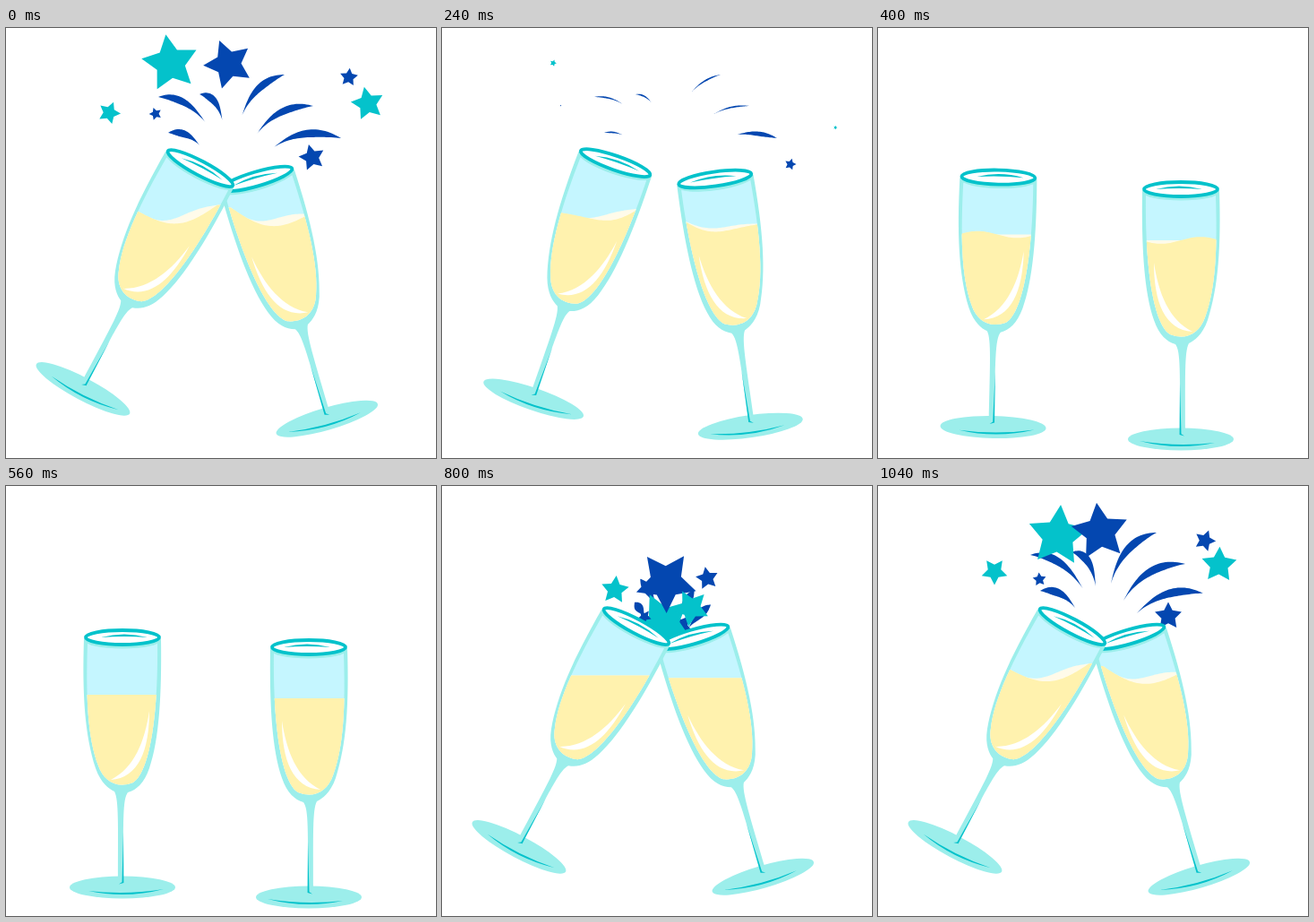
Animation of 480x480 px, one loop 1120 ms. Source, as an HTML page with a canvas:

```html
<!DOCTYPE html>
<html lang="en">
<head>
<meta charset="utf-8">
<title>Champagne toast</title>
<style>
html, body { margin: 0; height: 100%; overflow: hidden; background: #fff; }
canvas { display: block; }
</style>
</head>
<body>
<canvas id="stage" width="480" height="480"></canvas>
<script>
const ctx = document.getElementById('stage').getContext('2d');
const STEP = 80, STEPS = 14, CLINK = 10;
const TEAL = '#04c2cb', BLUE = '#0447b0', GLASS = '#9ceeeb', CLEAR = '#c5f6ff',
      WINE = '#fff2ae', FOAM = '#fffbea';
const { sin, cos, PI, min, max } = Math;

// Glass outlines; the origin is the centre of the foot.
const outer = new Path2D('M-43-278C-45-215-42-170-30-133C-24-116-15-110-9-107C-4-98-5-70-5-5L1-4C1-75 0-98 6-106C16-109 24-116 30-133C41-165 44-215 43-278Z');
const inner = new Path2D('M-39-272C-41-215-39-167-27-136C-21-118-6-110 12-117C32-130 40-200 39-272Z');
const shine = new Path2D('M30-197C25-163 13-133-13-120C18-122 30-153 30-197Z');
const rimArc = new Path2D('M-24-279Q2-286 28-279Q2-281-24-279Z');
const footArc = new Path2D('M-38 4Q4 13 46 2Q4 9-38 4Z');
const stemLine = new Path2D('M1-62L1.4-5L-4-3.5L-.5-6Z');

// Feet shift and lift as the glasses tilt by a degrees.
const left = {
  lean: 28, release: 1.5, mirror: 1,
  foot: a => [130 - 1.2 * a - .0133 * a * a, 448 - 2.1 * a + .0175 * a * a],
  level: a => -215 + .03 * a * a
};
const right = {
  lean: 16.3, release: 1, mirror: -1,
  foot: a => [338 + .3 * a + .058 * a * a, 459 - 2.1 * a + .043 * a * a],
  level: () => -222
};

// colour, angle, radius, life in steps, then start, control and end of the path
const stars = [
  [BLUE, 42, 16, 8, 266, 157, 328, 138, 374, 148],
  [TEAL, 47, 36, 7.2, 247, 154, 206, 19, 145, 31],
  [BLUE, 35, 35, 6, 250, 107, 246, 34, 250, 30],
  [TEAL, 78, 16, 6, 193, 116, 116, 82, 95, 102],
  [BLUE, 37, 8, 7.2, 226, 146, 176, 92, 143, 87],
  [BLUE, 62, 13, 6, 296, 103, 377, 43, 410, 55],
  [TEAL, 44, 21, 7.2, 278, 136, 406, 60, 433, 96]
];

// life in steps, then start, control and tip
const streaks = [
  [7.5, 229, 115, 204, 74, 170, 77],
  [7.5, 243, 112, 238, 74, 216, 74],
  [7.5, 260, 109, 272, 62, 311, 52],
  [7.5, 274, 128, 298, 85, 343, 87],
  [9, 289, 142, 325, 106, 374, 123],
  [7.5, 220, 136, 204, 113, 181, 117]
];

const clamp = t => min(1, max(0, t));
const smooth = t => t * t * (3 - 2 * t);

function curve([x0, y0, x1, y1, x2, y2], t) {
  const mix = (a, b, c) => (1 - t) ** 2 * a + 2 * t * (1 - t) * b + t * t * c;
  return [mix(x0, x1, x2), mix(y0, y1, y2)];
}

function fill(color, path) {
  ctx.fillStyle = color;
  path ? ctx.fill(path) : ctx.fill();
}

function ellipse(y, rx, ry) {
  ctx.beginPath();
  ctx.ellipse(0, y, rx, ry, 0, 0, 7);
}

function polygon(points, color) {
  ctx.beginPath();
  points.forEach(p => ctx.lineTo(...p));
  fill(color);
}

function drawStar([color, angle, radius, life, ...path], age) {
  if (age >= life) return;
  const [x, y] = curve(path, age / 6);
  const r = radius * (1 - (age / life) ** 4);
  const turn = (angle - 14 * age) * PI / 180;
  polygon(Array.from({ length: 10 }, (_, i) => {
    const a = turn + i * PI / 5, d = i % 2 ? r * .51 : r;
    return [x + d * sin(a), y - d * cos(a)];
  }), color);
}

// The tip shoots out first, then the tail catches up with it.
function drawStreak([life, ...path], age) {
  if (age >= life) return;
  const from = (age - 3) * (age < 3 ? .067 : .125);
  const to = min(1, .15 + 2.2 * age / life);
  const width = 9.5 * (1 - (age / life) ** 3);
  const upper = [], lower = [];
  for (let s = 0; s <= 1; s += 1 / 32) {
    const t = from + (to - from) * s;
    const [x, y] = curve(path, t), [nx, ny] = curve(path, t + .01);
    const h = width / 2 * sin(PI * s ** 1.4) / Math.hypot(nx - x, ny - y);
    const dx = (ny - y) * h, dy = (nx - x) * h;
    upper.push([x - dx, y + dy]);
    lower.unshift([x + dx, y - dy]);
  }
  polygon(upper.concat(lower), BLUE);
}

// 1 while the glasses touch, 0 when they stand upright
function sway(k, release) {
  if (k >= CLINK) return 1;
  return k < 7 ? 1 - smooth(clamp((k - release) / 4)) : ((k - 7) / 3) ** 1.6;
}

function drawLiquid({ mirror, level }, age, a, x, y) {
  const dip = 17 * sin(PI * clamp(age / 8)) ** .5;
  const ripple = -4 * sin(PI * clamp((age - 6) / 5));
  const top = y + level(a) - .6 * dip;
  const mid = x + mirror * 225 * sin(a * PI / 180);
  const surface = (color, height) => {
    const points = [[mid + 150, 480], [mid - 150, 480]];
    for (let d = -60; d <= 60; d += 2) {
      const u = clamp(.5 + d / 88);
      const slope = mirror * dip * d / 215;
      points.push([mid + d, top - slope + height(sin(PI * u), sin(2 * PI * u))]);
    }
    polygon(points, color);
  };
  surface(FOAM, (one, two) => dip * (.6 * one + .25 * two));
  surface(WINE, (one, two) => dip * one + mirror * ripple * two);
}

function drawGlass(glass, k, age) {
  const a = glass.lean * sway(k, glass.release), [x, y] = glass.foot(a);
  ctx.save();
  ctx.translate(x, y);
  ctx.scale(glass.mirror, 1);
  ctx.rotate(a * PI / 180);
  ellipse(0, 59, 12.5);
  fill(GLASS);
  fill(TEAL, footArc);
  fill(GLASS, outer);
  fill(TEAL, stemLine);
  fill(CLEAR, inner);

  // The liquid keeps level while the glass around it tilts.
  ctx.save();
  ctx.clip(inner);
  ctx.setTransform(1, 0, 0, 1, 0, 0);
  drawLiquid(glass, age, a, x, y);
  ctx.restore();

  fill('#fff', shine);
  ellipse(-276, 42.5, 9.5);
  fill(GLASS);
  ellipse(-279, 41, 8);
  fill('#fff');
  ctx.strokeStyle = TEAL;
  ctx.lineWidth = 3.8;
  ctx.stroke();
  fill(TEAL, rimArc);
  ctx.restore();
}

function draw(now) {
  const k = Math.floor(now / STEP) % STEPS;
  const age = (k + STEPS - CLINK) % STEPS;
  ctx.fillStyle = '#fff';
  ctx.fillRect(0, 0, 480, 480);
  streaks.forEach(s => drawStreak(s, age));
  stars.forEach(s => drawStar(s, age));
  drawGlass(right, k, age);
  drawGlass(left, k, age);
}

const start = performance.now();
function tick() {
  draw(performance.now() - start);
  requestAnimationFrame(tick);
}
tick();
</script>
</body>
</html>
```
